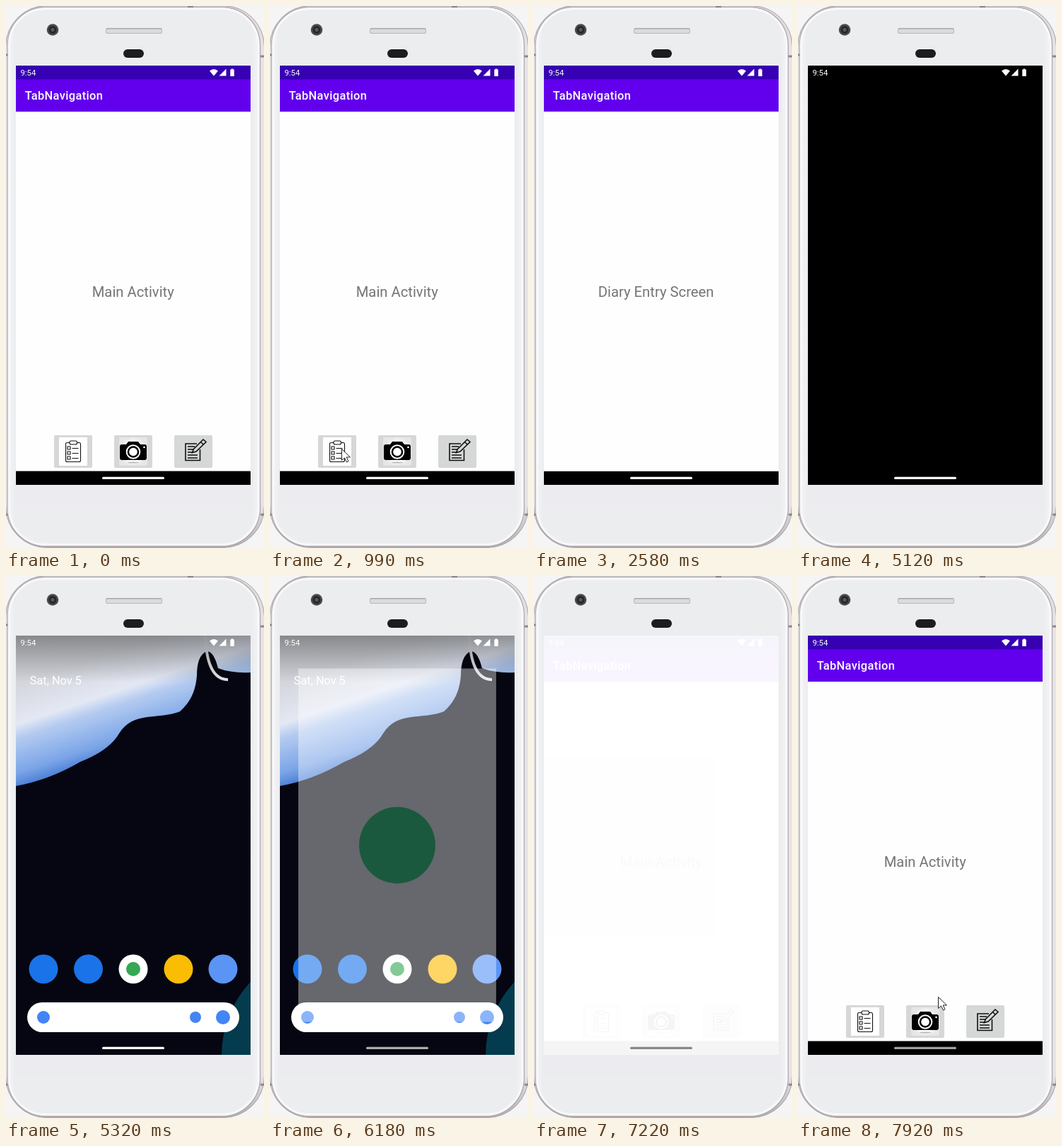
Write an HTML page that moves like this. It is 365 by 764 pixels and loops after 7990 ms.

```html
<!DOCTYPE html>
<html lang="en">
<head>
<meta charset="utf-8">
<title>Tab navigation demo</title>
<style>
  html, body { margin: 0; width: 100%; height: 100%; overflow: hidden; background: #f5f5f5; }
  svg { display: block; width: 365px; height: 764px; font-family: Roboto, sans-serif; }
  .title { font-size: 16.4px; font-weight: 500; letter-spacing: .022em; fill: #fff; }
  .label { font-size: 20.25px; fill: #757575; }
  .line { fill: none; stroke: #111; }
</style>
</head>
<body>
<svg viewBox="0 0 365 764">
  <defs>
    <clipPath id="screenClip"><rect x="14" y="84" width="332" height="591"/></clipPath>
    <linearGradient id="metal" x2="0" y2="1">
      <stop stop-color="#dcd9db"/><stop offset=".1" stop-color="#e6e4e6"/>
      <stop offset=".92" stop-color="#e6e4e6"/><stop offset="1" stop-color="#b3adb1"/>
    </linearGradient>
    <linearGradient id="plate">
      <stop stop-color="#f6f6f8"/><stop offset=".03" stop-color="#ecedef"/>
      <stop offset=".97" stop-color="#ecedef"/><stop offset="1" stop-color="#f6f6f8"/>
    </linearGradient>
    <linearGradient id="sky" gradientUnits="userSpaceOnUse" x1="47" y1="142" x2="91" y2="275">
      <stop stop-color="#d4d6dc"/><stop offset=".38" stop-color="#e4e8f4"/>
      <stop offset=".52" stop-color="#b4cbf0"/><stop offset=".85" stop-color="#7ba5e8"/>
      <stop offset="1" stop-color="#4a7ed4"/>
    </linearGradient>
    <linearGradient id="scrim" x2="0" y2="1">
      <stop stop-opacity=".36"/><stop offset="1" stop-opacity="0"/>
    </linearGradient>
    <radialGradient id="vignette">
      <stop offset=".7" stop-color="#fff"/><stop offset="1" stop-color="#e6e6e6"/>
    </radialGradient>
    <g id="page">
      <rect x="-40" y="148.600" width="440" height="507" fill="#fefefe"/>
      <rect x="-40" y="103.400" width="440" height="45.200" fill="#6200ee"/>
      <text class="title" x="26.800" y="132.400">TabNavigation</text>
    </g>
    <rect id="tile" y="605" width="54" height="46" rx="2" fill="#d6d7d7"/>
  </defs>

  <!-- phone body -->
  <rect x="-.5" y="-.5" width="366" height="764" rx="58" fill="url(#metal)" stroke="#aaa4a8"/>
  <rect x="2" y="1.500" width="357.500" height="760" rx="54" fill="url(#plate)" stroke="#aea8ac" stroke-width="1.300"/>
  <rect x="4.500" y="4" width="352.500" height="755" rx="51" fill="none" stroke="#f8f8fa" stroke-width="3"/>
  <path d="M257 .8h8M0 69h2.500M360 71h5M0 717h2.500M360 717h5" stroke="#8f898d" stroke-width="3"/>
  <rect x="14" y="675" width="332" height="30" fill="#ecebef"/>
  <circle cx="66" cy="33.500" r="8.300" fill="#4a4a4c"/>
  <circle cx="66" cy="33.500" r="5.500" fill="#28282b"/>
  <circle cx="66" cy="33.500" r="2.500" fill="#59595e"/>
  <rect x="141.500" y="31.500" width="79" height="7" rx="1.500" fill="#dcdcde" stroke="#b6b5b8"/>
  <path d="M142 32h78" stroke="#a3a2a5"/>
  <rect x="166" y="61" width="29" height="12" rx="6" fill="#1d1d20"/>

  <g clip-path="url(#screenClip)">
    <rect x="14" y="84" width="332" height="591"/>

    <g id="app">
      <rect x="14" y="84" width="332" height="20" fill="#3700b3"/>
      <g id="main">
        <use href="#page"/>
        <text class="label" x="121.700" y="410.300">Main Activity</text>
        <use href="#tile" x="68"/><use href="#tile" x="153"/><use href="#tile" x="238"/>

        <rect x="75" y="608" width="40" height="40" fill="#fff"/>
        <g class="line" stroke-width="1.100">
          <rect x="84.500" y="615.500" width="21" height="27" rx="2"/>
          <rect x="90" y="613" width="10.500" height="5" rx="2" fill="#fff"/>
          <path d="M87 621h4v4h-4zm0 7h4v4h-4zm0 7h4v4h-4zM93.500 623.500h9m-9 7h9m-9 7h9"/>
        </g>

        <rect x="160" y="608" width="40" height="40" rx="3" fill="url(#vignette)"/>
        <ellipse cx="180" cy="643.500" rx="8" ry="1" fill="#bbb"/>
        <path d="M164 618h6l3-4h14l3 4h6q3 0 3 3v16q0 3-3 3h-32q-3 0-3-3v-16q0-3 3-3z"/>
        <circle cx="180" cy="628.500" r="9.300" stroke="#fff" stroke-width="2"/>
        <circle cx="180" cy="628.500" r="5.800" fill="#fff"/>
        <circle cx="195.500" cy="622" r="1.300" fill="#fff"/>

        <g class="line" stroke-width="1.600">
          <path d="M270 617h-16v23.500h20.500V625"/>
          <path d="M257 621h10m-10 4h8m-8 4h6m-6 4h14m-14 4h14" stroke-width="1.300"/>
          <path d="M263.500 629.500l2-5 13.500-13.500 4 3.500-14 13.500zM275 614l4 4" fill="#d6d7d7"/>
        </g>
      </g>
      <g id="diary">
        <use href="#page"/>
        <text class="label" x="90.700" y="410.300">Diary Entry Screen</text>
      </g>
    </g>

    <g id="home">
      <rect x="14" y="84" width="332" height="591" fill="#060612"/>
      <path d="M14 84H346V136Q318 137 300 130Q294 106 284 106Q270 112 270 140Q268 172 246 191C215 203 180 190 160 222Q146 246 105 262Q60 288 14 296Z" fill="url(#sky)"/>
      <path d="M282 84Q284 146 314 146" fill="none" stroke="#e4e5e9" stroke-width="4"/>
      <rect x="14" y="84" width="332" height="66" fill="url(#scrim)"/>
      <path d="M346 572Q306 615 305 675H346Z" fill="#043b4e"/>
      <text x="33.800" y="153" font-size="16.300" fill="#fff">Sat, Nov 5</text>
      <g fill="#1a73e8">
        <circle cx="53" cy="554" r="20.500"/>
        <circle cx="116.500" cy="554" r="20.500"/>
        <circle cx="180" cy="554" r="20.500" fill="#fff"/>
        <circle cx="180" cy="554" r="10" fill="#34a853"/>
        <circle cx="244" cy="554" r="20.500" fill="#fbbc04"/>
        <circle cx="307" cy="554" r="20.500" fill="#5a94f5"/>
      </g>
      <rect x="30" y="601" width="300" height="42" rx="21" fill="#fff"/>
      <g fill="#4285f4">
        <circle cx="53" cy="622" r="9"/><circle cx="268" cy="622" r="8"/><circle cx="307" cy="622" r="10"/>
      </g>
    </g>

    <g fill="#fff">
      <text x="20.500" y="98" font-size="11.300">9:54</text>
      <path d="M288 91.500q6-5 12 0l-6 7zM301.500 98.500h10v-10zM317.300 89.500h1.500v-1h2.500v1h1.500v9.500h-5.500z"/>
    </g>

    <g id="splash">
      <rect x="14" y="84" width="332" height="591" fill="#fff"/>
      <circle id="badge" cx="180" cy="379.500" r="64" fill="#3ddc84"/>
    </g>
    <rect id="pill" x="136" y="663.700" width="88" height="3.300" rx="1.600"/>
  </g>

  <circle id="tap" cx="101" cy="624" r="15" fill="#000" fill-opacity=".15"/>
  <path id="cursor" d="M.5.5V16.500l4-3.500 3 6 2.500-1.200-2.800-5.800h5.300z" fill="#fff" stroke="#222"/>
</svg>
<script>
const LOOP = 7990;
const TICK = 70;
const el = id => document.getElementById(id);
const clamp = x => Math.min(1, Math.max(0, x));
const mix = (a, b, k) => a.map((v, i) => v + (b[i] - v) * k);
const show = (id, opacity) => { el(id).style.opacity = Number(opacity); };
const move = (id, x, y = 0) => el(id).setAttribute("transform", `translate(${x} ${y})`);

// Progress from 0 at start to 1 at end, held in n discrete steps.
const stepped = (t, start, end, n) =>
  clamp(Math.floor((t - start) / (end - start) * (n - 1) + .001) / (n - 1));

const BUTTON = [101, 624];
const RETURN_PATH = [[250, 268], [243, 306], [201, 499], [199, 576], [199, 588], [198, 593]];
const PILL = [[0, "#fff"], [6180, "#aaa"], [6250, "#fff"], [6520, "#f4f4f4"], [6660, "#ddd"],
  [6870, "#bbb"], [7010, "#888"], [7850, "#949494"], [7920, "#a0a0a0"]];

function cursorAt(t) {
  if (t < 440) return null;
  if (t < 2300) {
    const p = stepped(t, 440, 990, 8);
    return mix([271, 725], BUTTON, 1 - (1 - p) ** 2);
  }
  if (t < 2580) return mix(BUTTON, [251, 6], (stepped(t, 2300, 2580, 5) + .25) ** 2);
  return t < 7570 ? null : RETURN_PATH[Math.min(5, Math.floor((t - 7570) / TICK))];
}

function drawSplash(t) {
  const k = Math.max(0, Math.floor((t - 6180) / TICK));
  const scale = 1 - .157 * .2 ** k;
  const exit = t < 7010 ? 0 : stepped(t, 7010, 7790, 12) + 1 / 12;
  el("splash").setAttribute("transform",
    `translate(180 379.5) scale(${scale}) translate(-180 -379.5)`);
  show("badge", clamp(1 - exit * 4));
  show("splash", t < 6180 ? 0 : Math.min(1, .39 + .5 * k) * (1 - clamp((exit - .25) / .4)));
}

function draw(t) {
  const p = stepped(t, 1470, 2100, 10);
  const slide = 1 - (1 - p) ** 6;
  const relaunched = t >= 6520;
  show("app", t < 5120 || relaunched);
  show("home", t >= 5320 && !relaunched);
  move("main", relaunched ? 0 : -33.2 * slide);
  move("diary", 33.2 * (1 - slide));
  show("diary", relaunched ? 0 : clamp((p * 450 - 50) / 83));
  show("tap", t >= 1320 && t < 1470);
  drawSplash(t);
  el("pill").setAttribute("fill", PILL.findLast(([start]) => t >= start)[1]);

  const tip = cursorAt(t);
  show("cursor", tip !== null);
  if (tip) move("cursor", ...tip);
}

function tick() {
  draw(performance.now() % LOOP);
  requestAnimationFrame(tick);
}
tick();
</script>
</body>
</html>
```
